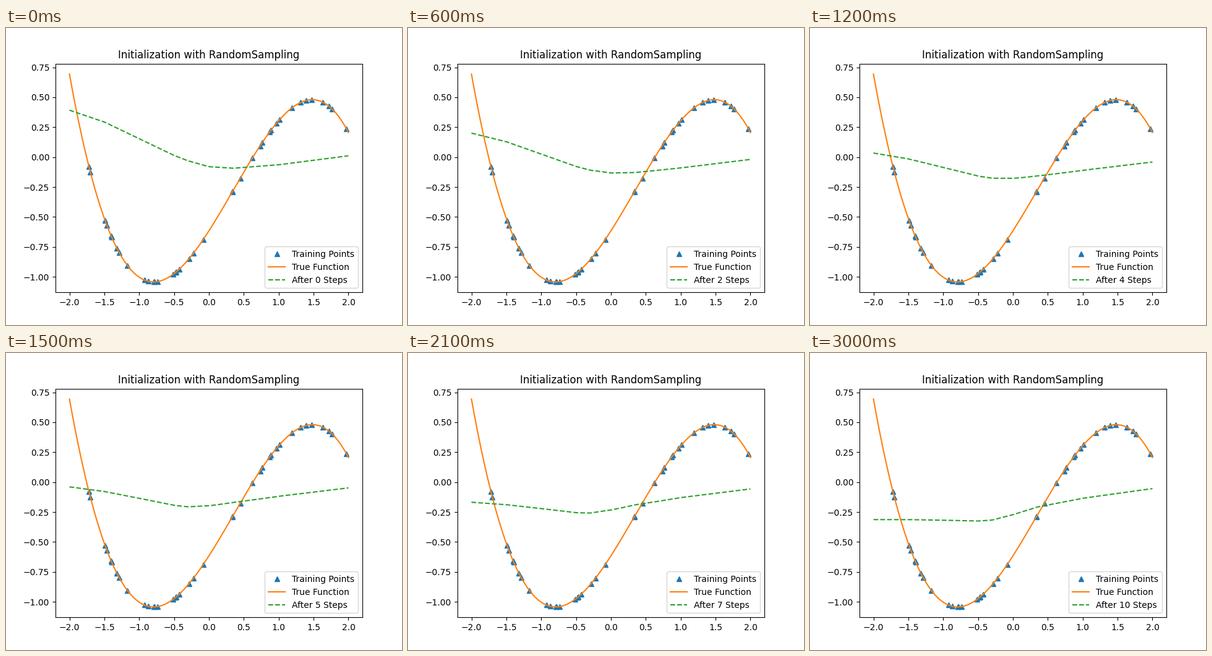
These frames come from a looping animation (640 px wide and 480 px high, 3.3 s). A matplotlib script:

```python
import numpy as np
import matplotlib.pyplot as plt
from matplotlib.animation import FuncAnimation

LAST_STEP = 10

true_function = np.poly1d([-0.2585, 0.2663, 0.912, -0.6155])

# Sampled inputs; their heights follow from the true function
train_x = np.array([
    -1.721, -1.70, -1.49, -1.463, -1.402, -1.393, -1.319, -1.286, -1.167, -0.927,
    -0.873, -0.79, -0.78, -0.736, -0.514, -0.48, -0.472, -0.425, -0.288, -0.226,
    -0.08, 0.334, 0.341, 0.448, 0.625, 0.732, 0.764, 0.868, 0.89, 0.967,
    1.01, 1.192, 1.317, 1.397, 1.477, 1.632, 1.72, 1.766, 1.97])

xs = np.linspace(-2, 2, 200)

# The model is piecewise linear: its bends, untrained and trained heights
bends = [-2, -1.5, -1, -0.5, -0.3, 0, 0.35, 1, 2]
untrained = np.interp(xs, bends, [0.392, 0.293, 0.154, 0.014, -0.031, -0.080, -0.093, -0.064, 0.011])
trained = np.interp(xs, bends, [-0.313, -0.313, -0.318, -0.325, -0.317, -0.272, -0.208, -0.135, -0.054])

# Training slows down towards the end, more so on the right side
slowdown = 0.45 + 0.6 * np.maximum(xs, 0)


def model(step):
    u = step / LAST_STEP
    progress = u + slowdown * u * (1 - u)
    return untrained + (trained - untrained) * progress


fig, ax = plt.subplots(figsize=(6.4, 4.8), dpi=100)
ax.plot(train_x, true_function(train_x), "^", label="Training Points")
ax.plot(xs, true_function(xs), label="True Function")
model_line, = ax.plot(xs, model(0), "--", label="After 0 Steps")
ax.set_title("Initialization with RandomSampling")
step_label = ax.legend(loc="lower right").get_texts()[2]


def update(step):
    model_line.set_ydata(model(step))
    step_label.set_text(f"After {step} Steps")
    return model_line, step_label


anim = FuncAnimation(fig, update, frames=LAST_STEP + 1, interval=300, repeat=True, repeat_delay=0)
plt.show()
```
